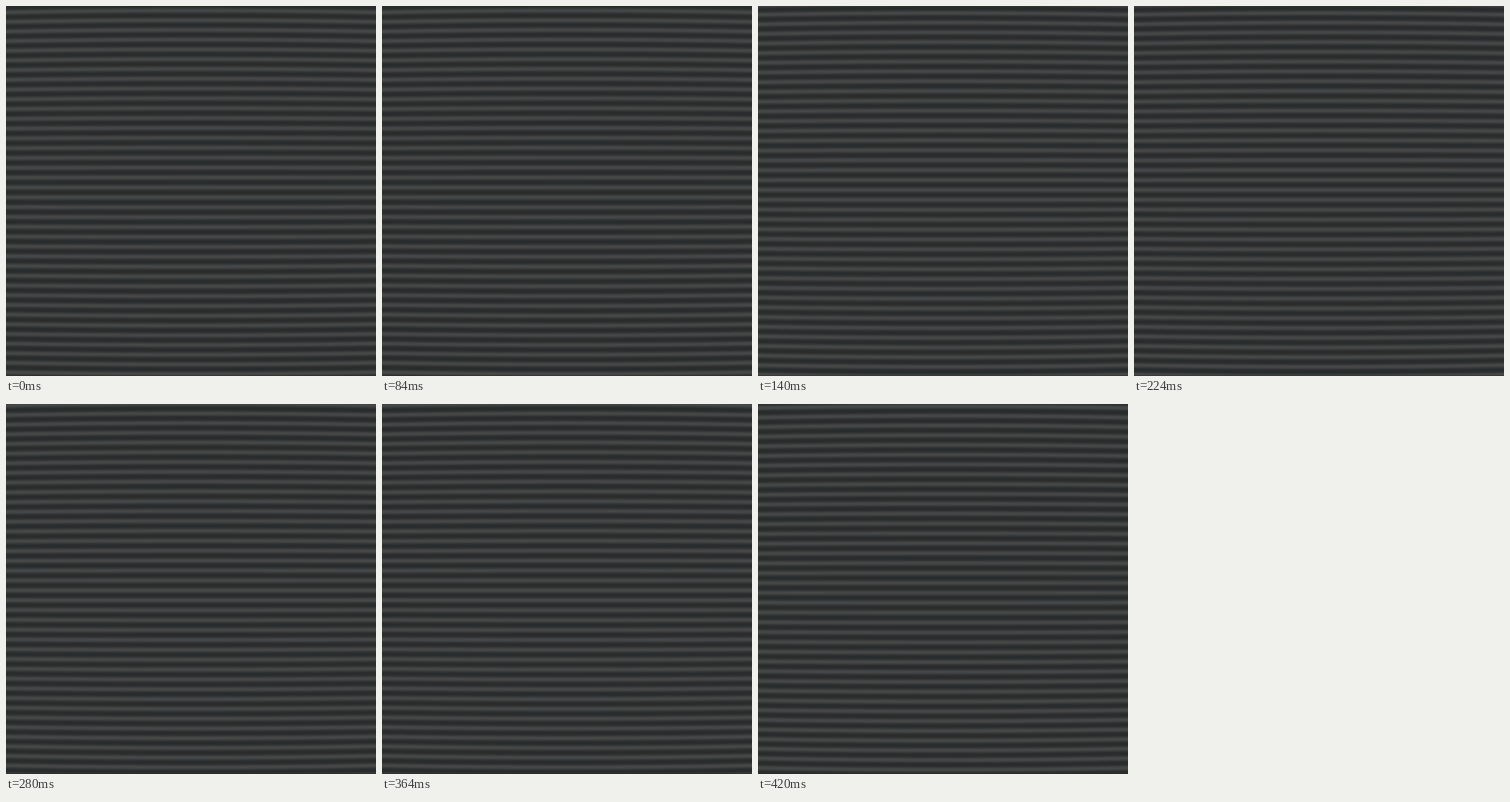
An HTML page with a canvas for the animation above (560 ms loop, 480 by 480 pixels).

```html
<!DOCTYPE html>
<html lang="en">
<head>
<meta charset="utf-8">
<title>Curved scanlines</title>
<style>
  html, body { margin: 0; height: 100%; overflow: hidden; background: #2b2e2e; }
  canvas { display: block; width: 100vw; height: 100vh; }
</style>
</head>
<body>
<canvas id="screen" width="480" height="480"></canvas>
<script>
const SIZE = 480, LOOP = 560, STEPS = 4;
const PERIOD = 12.87, OFFSET = 8.2, CURVE = 0.04;
const DARK = [41, 44, 44], LIGHT = [70, 72, 71], RIM = [50, 40, 43];

const ctx = document.getElementById('screen').getContext('2d');
const image = ctx.createImageData(SIZE, SIZE);
const mix = (a, b, t) => a + (b - a) * t;

// Height on the flat screen, in scanline periods, behind a bulged glass
function scanline(px, py) {
  const x = (px + 0.5) / SIZE - 0.5, y = (py + 0.5) / SIZE - 0.5;
  const bulge = CURVE * (x * x + y * y);
  return (y * (1 + bulge * (1 + bulge)) * SIZE - OFFSET) / PERIOD;
}

function draw(shift) {
  const data = image.data;
  for (let y = 0, i = 0; y < SIZE; y++) {
    for (let x = 0; x < SIZE; x++, i += 4) {
      const wave = 0.5 + 0.5 * Math.cos(2 * Math.PI * (scanline(x, y) - shift));
      const glow = Math.pow(wave, 1.4);
      for (let c = 0; c < 3; c++) {
        const tone = mix(DARK[c], LIGHT[c], glow);
        data[i + c] = y === SIZE - 1 ? mix(tone, RIM[c], 0.6) : tone;
      }
      data[i + 3] = 255;
    }
  }
  ctx.putImageData(image, 0, 0);
}

const start = performance.now();
let shown = -1;

function tick() {
  const time = (performance.now() - start) % LOOP;
  const step = Math.floor(time / LOOP * STEPS);
  if (step !== shown) draw((shown = step) / STEPS);
  requestAnimationFrame(tick);
}
tick();
</script>
</body>
</html>
```
